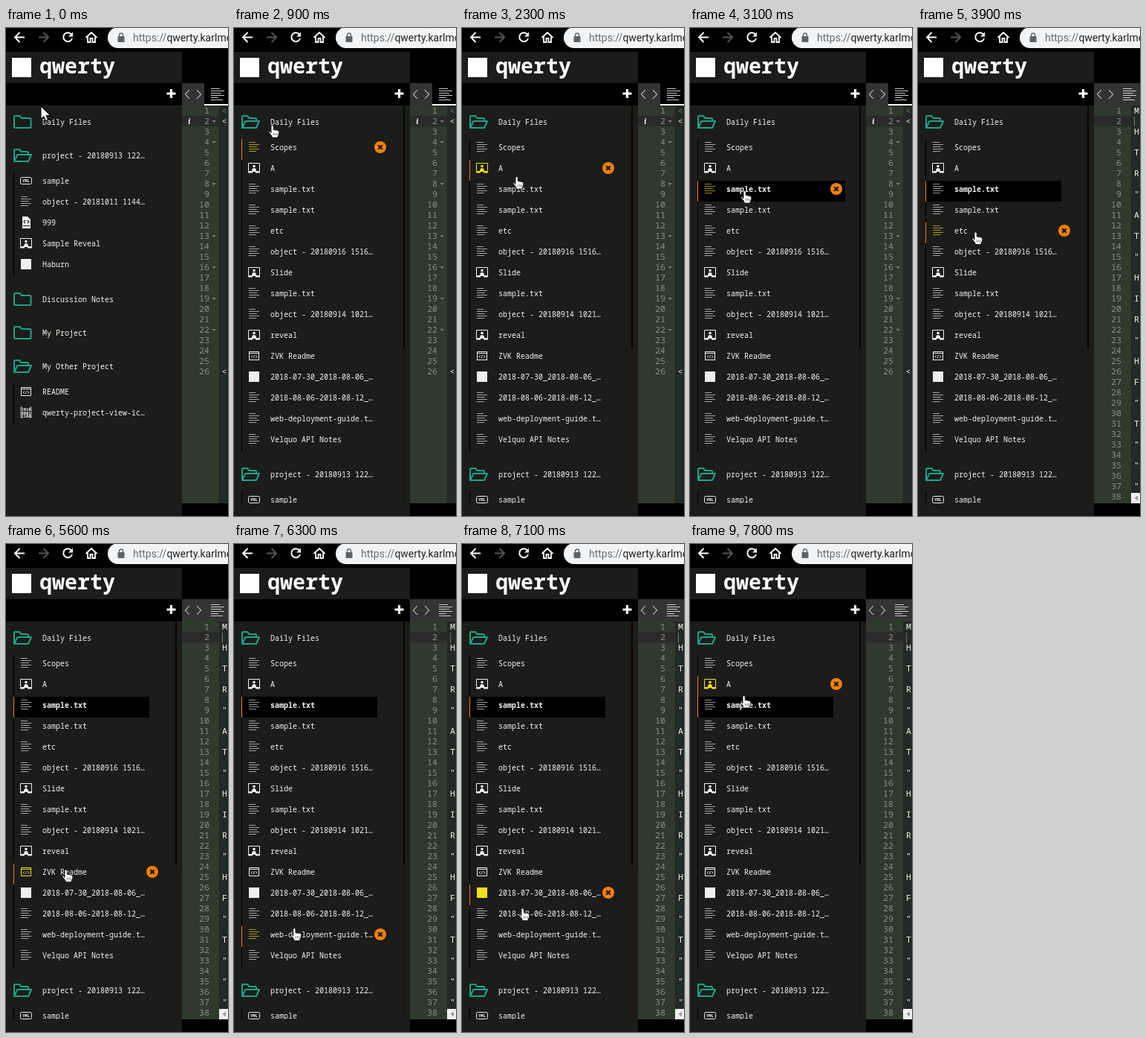
Animation, 299 px wide and 655 px high, one loop 8000 ms. Source, as an HTML page:

```html
<!DOCTYPE html>
<html lang="en">
<head>
<meta charset="utf-8">
<title>File browser</title>
<style>
  html, body { margin: 0; width: 100%; height: 100%; overflow: hidden; background: #000; }
  svg { display: block; }
  text { white-space: pre; }
  .label { font: 10px "Noto Sans Mono", monospace; fill: #f2f2f2; }
  .bold { font-weight: 700; }
  .code { font: 11.67px "Noto Sans Mono", monospace; fill: #f2f2ec; }
  .num { fill: #8b8f86; text-anchor: end; }
  .info { font: italic 700 10px "Noto Serif", serif; fill: #f2f2ec; }
  .title { font: 600 28.3px "Noto Sans Mono", monospace; fill: #fff; }
  .url { font: 14px Roboto, sans-serif; fill: #202124; }
  .scheme { fill: #6a6d71; }
  .tiny { font: bold 5.5px "Noto Sans Mono", monospace; text-anchor: middle; }
</style>
</head>
<body>
<svg id="stage" width="299" height="655"></svg>
<script>
const LOOP = 8000, STEP = 100;
const OPEN_FOLDER = 200, EXPAND = 600, SELECT = 3100, LOAD = 3900;
const ROW = 28, FIRST_ROW = 149, SELECTED = 2;

const daily = [
  ['Scopes', 'lines'], ['A', 'slide'], ['sample.txt', 'lines'], ['sample.txt', 'lines'],
  ['etc', 'lines'], ['object - 20180916 1516…', 'lines'], ['Slide', 'slide'],
  ['sample.txt', 'lines'], ['object - 20180914 1021…', 'lines'], ['reveal', 'slide'],
  ['ZVK Readme', 'markup'], ['2018-07-30_2018-08-06_…', 'square'],
  ['2018-08-06-2018-08-12_…', 'lines'], ['web-deployment-guide.t…', 'lines'],
  ['Velquo API Notes', 'lines']
];
const folders = [
  ['Daily Files', []],
  ['project - 20180913 122…', [['sample', 'yml'], ['object - 20181011 1144…', 'lines'],
    ['999', 'doc'], ['Sample Reveal', 'slide'], ['Haburn', 'square']]],
  ['Discussion Notes', []],
  ['My Project', []],
  ['My Other Project', [['README', 'markup'], ['qwerty-project-view-ic…', 'binary']]]
];

// Pointer moves: start, end, target x, target y
const moves = [
  [0, 100, 46, 130], [900, 1100, 54, 170], [1300, 1400, 57, 171], [1900, 2000, 63, 188],
  [2200, 2300, 68, 199], [2600, 2800, 68, 218], [3300, 3400, 70, 245], [3600, 4200, 74, 302],
  [4400, 6600, 76, 549], [6900, 7300, 76, 428], [7500, 7800, 67, 203]
];

function pointer(t) {
  let x = 47, y = 105;
  for (const [start, end, toX, toY] of moves) {
    const k = Math.min(1, Math.max(0, (t - start) / (end - start)));
    x += (toX - x) * k;
    y += (toY - y) * k;
  }
  return [x, y];
}

// The highlight runs one step ahead of the drawn pointer
const hoveredRow = t => Math.floor((pointer(t + STEP)[1] - FIRST_ROW) / ROW);

const rect = (x, y, w, h, fill, more = '') =>
  `<rect x="${x}" y="${y}" width="${w}" height="${h}" fill="${fill}" ${more}/>`;
const text = (x, y, cls, str, more = '') =>
  `<text x="${x}" y="${y}" class="${cls}" ${more}>${str.replace(/</g, '&lt;')}</text>`;
const line = (d, color, width = 1, more = '') =>
  `<path d="${d}" fill="none" stroke="${color}" stroke-width="${width}" ${more}/>`;
const shape = (d, fill, more = '') => `<path d="${d}" fill="${fill}" ${more}/>`;
const at = (x, y, content) => `<g transform="translate(${x} ${y})">${content}</g>`;

// Icons are centred on the origin
const icons = {
  lines: c => line('M-7-6.5H2M-7-3.5H7M-7-.5H4M-7 2.5H7M-7 5.5H3', c, 1, 'opacity=".65"'),
  slide: c => line('M-7.5-6.5H7.5V4.5H-7.5Z', c) + `<circle cy="-2.5" r="1.8" fill="${c}"/>` +
    shape('M-3 4Q-3 0 0 0T3 4ZM-8 5H-2V6.500H-8ZM2 5H8V6.500H2Z', c),
  markup: c => line('M-6.5-5.5H6.5V5.5H-6.5ZM-6.5-3.5H6.5', c) +
    line('M-2-.8L-4 1L-2 2.8M2-.8L4 1L2 2.8M.7-1.2L-.7 3.2', c, .8),
  square: c => rect(-7, -7, 14, 14, c),
  yml: c => rect(-7.5, -4.5, 15, 9, 'none', `rx="2" stroke="${c}"`) +
    text(0, 2.2, 'tiny', 'YML', `fill="${c}"`),
  doc: c => shape('M-5-8H2L6-4V8H-5Z', c) +
    line('M-1-3L-3-1L-1 1M2-3L4-1L2 1M-4 4.5H5', '#222', 1.2),
  binary: c => line('M-5-7H-7V7H-5M5-7H7V7H5', c, .8) +
    ['1010', '0001', '1100'].map((s, i) => text(0, -2 + i * 4.5, 'tiny', s, `fill="${c}"`)).join('')
};

function folderIcon(y, open) {
  const body = open
    ? 'M1 17V2.5Q1 1 2.5 1H8L10.5 4H18.5Q20 4 20 5.5V8M1 17L5.5 8H24L20 17Z'
    : 'M1 2.5Q1 1 2.5 1H8.5L11 4H22Q23.5 4 23.5 5.5V15.5Q23.5 17 22 17H2.5Q1 17 1 15.5Z';
  return at(10, y - 9, line(body, '#1ba588', 2, 'stroke-linejoin="round"'));
}

function fileRow([name, icon], y, hover, selected) {
  let out = '';
  if (selected) out += rect(11, y - 11, hover ? 198 : 182, ROW, '#000');
  if (hover || selected) out += rect(10, y - 11, 1, ROW, '#f08010');
  out += at(27, y, icons[icon](hover ? '#eee01c' : '#eee'));
  out += text(49, y + 4, selected ? 'label bold' : 'label', name);
  if (hover) {
    out += at(197, y, '<circle r="8" fill="#f08010"/>' +
      line('M-2.8-2.8L2.8 2.8M2.8-2.8L-2.8 2.8', '#1c1208', 2));
  }
  return out;
}

function fileList(t) {
  const expanded = t >= EXPAND, hover = hoveredRow(t);
  let y = 126, out = '';
  folders.forEach(([name, files], i) => {
    const first = i === 0;
    const rows = first && expanded ? daily : files;
    out += folderIcon(y, rows.length || first && t >= OPEN_FOLDER) + text(49, y + 4, 'label', name);
    if (!rows.length) { y += 45; return; }
    y += 34;
    out += rect(10, y - 11, 1, rows.length * ROW, '#000');
    rows.forEach((file, n) => {
      out += fileRow(file, y, first && n === hover, first && n === SELECTED && t >= SELECT);
      y += ROW;
    });
    y += 19;
  });
  if (expanded) out += rect(228, 104, 2, 534, '#181817') + rect(228, 104, 2, 326, '#060606');
  return `<svg y="104" width="237" height="534" viewBox="0 104 237 534">${out}</svg>`;
}

function editor(loaded) {
  const lineY = n => 101 + n * 14;
  const lines = loaded ? 38 : 26;
  let out = rect(237, 74, 62, 30, '#333') + rect(237, 104, 50, 534, '#30392d') +
    rect(287, 104, 12, 534, '#232925') + rect(237, 118, 50, 14, '#282b28');
  if (!loaded) out += rect(267, 74, 32, 30, '#000') + rect(267, 102, 32, 2, '#fff');
  out += line('M247 83L241.5 89L247 95M257 83L262.5 89L257 95', '#ccc', 1.1);
  out += line('M276 81.5H288M276 84.5H294M276 87.5H290M276 90.5H294M276 93.5H286M276 96.5H292', '#ccc');
  for (let n = 1; n <= lines; n++) out += text(274, lineY(n), 'code num', String(n));
  if (loaded) {
    'M H T R " A T " H I R " H F " T " " "'.split(' ').forEach((s, i) =>
      out += text(291, lineY(2 * i + 1), 'code', s));
    out += rect(291, 119, 1, 13, '#777') + rect(287, 624, 12, 14, '#f1f1f1') +
      shape('M296 627.5V634.5L291.5 631Z', '#999');
  } else {
    [2, 4, 8, 13, 16, 19, 22].forEach(n =>
      out += shape(`M277.5 ${lineY(n) - 5}h5.5l-2.75 3z`, '#777d73'));
    out += text(245, 129, 'info', 'i');
    [1, 2, 26].forEach(n =>
      out += text(290.5, lineY(n), 'code bold', '<', n === 1 ? 'opacity=".4"' : ''));
  }
  return out;
}

const chrome =
  line('M25 12.5H12.5M18.5 6L12 12.5L18.5 19', '#fff', 2) +
  line('M44 12.5H56.5M50.5 6L57 12.5L50.5 19', '#555', 2) +
  line('M88 8.5A6 6 0 1 0 89 14', '#fff', 2) + shape('M90 5.5V11.5H84Z', '#fff') +
  line('M107.5 13L115 6L122.5 13M110 11.5V19H113.5V14H116.5V19H120V11.5', '#fff', 1.8) +
  rect(137, -1, 180, 28, '#f1f3f4', 'rx="14"') +
  rect(150.5, 11, 9, 8, '#5f6368', 'rx="1"') +
  line('M152.5 11V9.5a2.5 2.5 0 0 1 5 0V11', '#5f6368', 1.4) +
  '<text x="171" y="18" class="url"><tspan class="scheme">https://</tspan>qwerty.karlmo</text>';

const sidebar = rect(0, 32, 237, 623, '#1c1c1a') + rect(0, 74, 237, 30, '#000') +
  rect(8, 40, 26, 26, '#fff') + text(45, 60.5, 'title', 'qwerty') +
  line('M216.5 88H228.5M222.5 82V94', '#fff', 3.2);

const arrow = shape('M0 0V17L4 13.5L6.5 19.5L9.5 18.2L7 12.5H12.5Z', '#fff', 'stroke="#000"');
const hand = shape('M4 11V2a1.6 1.6 0 0 1 3.2 0V6.5L13 7.5Q15 8 14.8 10L14.3 13L13 15V17H5V15L1 10Q.5 8 2.5 8.5Z',
  '#fff', 'stroke="#111" stroke-width=".8"') + line('M7.5 11V14M9.8 11V14M12 11V14', '#333', .7);

const stage = document.getElementById('stage');
let shown = -1;

function render(now) {
  const t = Math.floor(now % LOOP / STEP) * STEP;
  if (t !== shown) {
    shown = t;
    stage.innerHTML = chrome + sidebar + editor(t >= LOAD) + fileList(t) +
      at(...pointer(t), t < STEP ? arrow : hand);
  }
  requestAnimationFrame(render);
}
render(performance.now());
</script>
</body>
</html>
```
